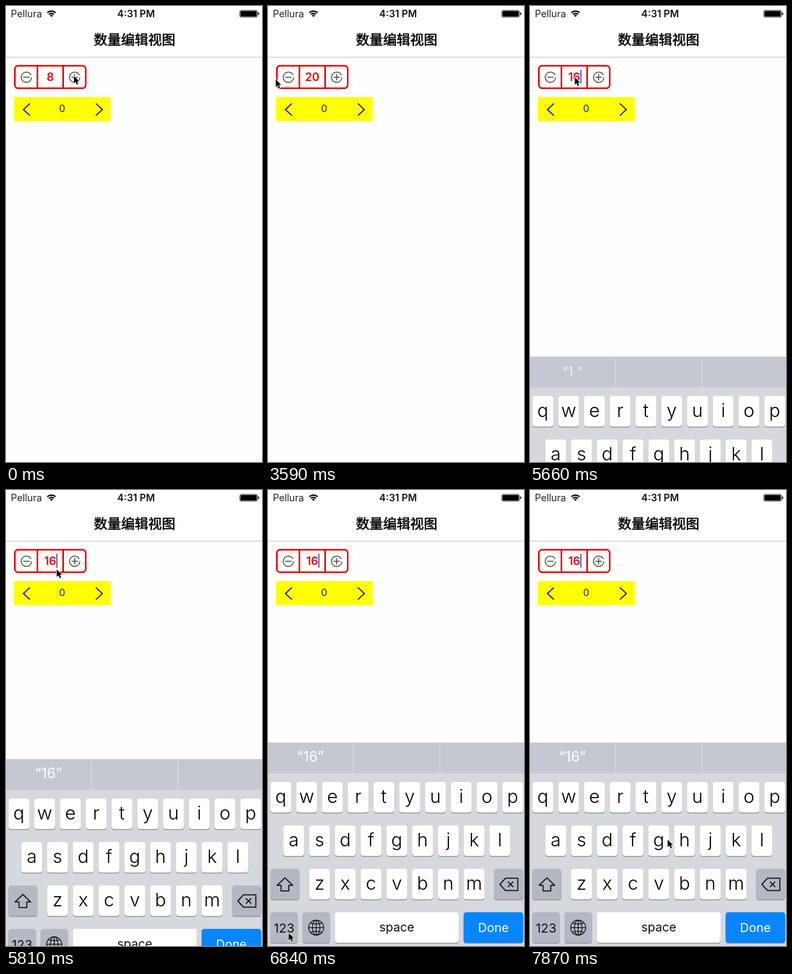
Write an HTML page with a canvas that moves like this. It is 477 px wide and 851 px high and loops after 8000 ms.

```html
<!DOCTYPE html>
<html lang="zh">
<head>
<meta charset="utf-8">
<title>数量编辑视图</title>
<style>
html, body { margin: 0; width: 100%; height: 100%; overflow: hidden; background: #fefefe; }
canvas { display: block; width: 477px; height: 851px; }
</style>
</head>
<body>
<canvas id="stage"></canvas>
<script>
const W = 477, H = 851, LOOP = 8000, TICK = 148.4;
const RED = '#f50000', DARK = '#484848', KEYS_IN = 38;
const canvas = document.getElementById('stage');
const ctx = canvas.getContext('2d');
const dpr = window.devicePixelRatio || 1;
canvas.width = W * dpr;
canvas.height = H * dpr;

const clamp = (v, lo, hi) => Math.max(lo, Math.min(hi, v));
const within = (n, from, to) => n >= from && n < to;

// Places where the pointer rests or turns, by tick.
const stops = [
  { n: 22, x: 126.5, y: 130.5 },
  { n: 24, x: 14.5, y: 137 },
  { n: 26, x: 26.5, y: 134 },
  { n: 33, x: 26.5, y: 134 },
  { n: 36, x: 83.5, y: 133 },
  { n: 38, x: 83.5, y: 133 },
  { n: 40, x: 105.5, y: 163.5 },
  { n: 46, x: 38.5, y: 826.5 },
  { n: 51, x: 270, y: 646 },
  { n: 53, x: 256.5, y: 652.5 }
];

function pointerAt(n) {
  const i = stops.findIndex(s => s.n >= n);
  const b = stops[i], a = stops[i - 1] || b;
  const k = a === b ? 0 : (n - a.n) / (b.n - a.n);
  const ease = k * k * (3 - 2 * k);
  return [a.x + (b.x - a.x) * ease, a.y + (b.y - a.y) * ease];
}

// Holding plus adds one per tick; each tap on minus takes two ticks.
const countAt = n => n < 26 ? clamp(n + 6, 8, 20) : Math.max(16, 19 - Math.floor((n - 26) / 2));
const plusDown = n => within(n, 1, 14) || within(n, 16, 21);
const minusDown = n => within(n, 26, 33) && n % 2 === 0;
const caretOn = n => n >= KEYS_IN && (n - KEYS_IN) % 7 < 4;

function text(s, x, y, size, weight, color, align = 'center', family = 'Inter, Roboto') {
  ctx.font = `${weight} ${size}px ${family}, sans-serif`;
  ctx.textAlign = align;
  ctx.fillStyle = color;
  ctx.fillText(s, x, y);
}

function rect(x, y, w, h, color) {
  ctx.fillStyle = color;
  ctx.fillRect(x, y, w, h);
}

function round(x, y, w, h, r, color) {
  ctx.beginPath();
  ctx.roundRect(x, y, w, h, r);
  ctx.fillStyle = color;
  ctx.fill();
}

function stroke(color, width) {
  ctx.strokeStyle = color;
  ctx.lineWidth = width;
  ctx.stroke();
}

function line(points, color, width, closed) {
  ctx.beginPath();
  for (let i = 0; i < points.length; i += 2) ctx.lineTo(points[i], points[i + 1]);
  if (closed) ctx.closePath();
  stroke(color, width);
}

function arc(x, y, r, from, to, color, width) {
  ctx.beginPath();
  ctx.arc(x, y, r, from, to);
  stroke(color, width);
}

function header() {
  rect(0, 0, W, 95, '#fff');
  rect(0, 95, W, 1, '#b8b8b8');
  text('Pellura', 9, 21, 18, 400, '#222', 'left');
  text('4:31 PM', 242.5, 20.8, 18.2, 600, '#111');

  const up = -Math.PI / 2;
  for (const r of [2, 6.8, 11]) arc(84.7, 20.5, r, up - .78, up + .78, '#000', r < 3 ? 4 : 2.4);

  ctx.beginPath();
  ctx.roundRect(435.5, 8, 33, 13, 3);
  stroke('#333', 1);
  round(436.8, 9.2, 30.4, 10.6, 1.5, '#000');
  round(469.6, 12, 2, 5, 1, '#000');

  const title = '数量编辑视图';
  text(title, 239.7, 71.5, 25.3, 500, '#000', 'center', '"Noto Sans CJK SC", "Noto Sans CJK"');
  ctx.strokeStyle = '#000';
  ctx.lineWidth = .7;
  ctx.strokeText(title, 239.7, 71.5);
}

function ringIcon(x, plus, color) {
  const y = 133;
  arc(x, y, 9.7, .02, Math.PI * 2 - .45, color, 1.7);
  line([x - 6, y, x + 6, y], color, 1.7);
  if (plus) line([x, y - 6, x, y + 6], color, 1.7);
}

function chevron(x, dir) {
  line([x - dir * 6, 182, x + dir * 6, 193.2, x - dir * 6, 204.5], '#222', 2.2);
}

function counters(n) {
  ctx.beginPath();
  ctx.roundRect(16.5, 111.5, 132, 42, 6);
  stroke(RED, 3);
  for (const x of [57, 105]) rect(x, 112, 3, 41, RED);
  ringIcon(38, false, minusDown(n) ? '#e83020' : DARK);
  ringIcon(128, true, plusDown(n) ? '#e83020' : DARK);
  text(countAt(n), 82.4, 139.6, 21, 600, RED);
  if (caretOn(n)) rect(93.5, 119, 2.5, 26, '#5068d8');

  rect(15, 170, 180, 45, '#ff0');
  chevron(38.5, -1);
  chevron(173.5, 1);
  text('0', 104.6, 198, 18, 400, '#222');
}

function key(x, y, w, color = '#fff') {
  round(x, y + 1.6, w, 57, 5, '#8b8e94');
  round(x, y, w, 57, 5, color);
}

function letterRow(letters, x, y) {
  [...letters].forEach((c, i) => {
    key(x + i * 48, y, 39);
    text(c, x + i * 48 + 19.5, y + 38.7, 34.5, 360, '#000');
  });
}

function globe(x, y, r) {
  arc(x, y, r, 0, 7, '#111', 1.5);
  ctx.beginPath();
  ctx.ellipse(x, y, r * .5, r, 0, 0, 7);
  for (const s of [-1, 1]) {
    ctx.moveTo(x - r * .78, y + s * r * .6);
    ctx.quadraticCurveTo(x, y + s * r * .38, x + r * .78, y + s * r * .6);
  }
  stroke('#111', 1.5);
  line([x, y - r, x, y + r], '#111', 1.5);
  line([x - r, y, x + r, y], '#111', 1.5);
}

function shiftIcon(x, y) {
  line([x, y - 14, x + 14.5, y, x + 7.2, y, x + 7.2, y + 10.5,
    x - 7.2, y + 10.5, x - 7.2, y, x - 14.5, y], '#111', 2, true);
}

function deleteIcon(x, y) {
  line([x - 20, y, x - 9.5, y - 11.5, x + 13.5, y - 11.5,
    x + 13.5, y + 11.5, x - 9.5, y + 11.5], '#111', 2, true);
  for (const s of [-5, 5]) line([x - 5, y - s, x + 5, y + s], '#111', 2);
}

// Laid out at its resting place and shifted down by a damped spring.
function keyboard(n) {
  const s = 1.735 + (n - KEYS_IN) * 2.4;
  ctx.save();
  ctx.translate(0, Math.round(379.5 * (1 + s) * Math.exp(-s)));
  ctx.lineJoin = 'round';

  rect(0, 471.5, W, 380, '#d5d9de');
  rect(0, 471.5, W, 57, '#c4c8d0');
  for (const x of [159, 319.7]) rect(x, 471.5, 1.3, 57, '#dcdfe4');
  if (n === KEYS_IN) text('“1 ”', 79, 507.5, 24, 400, 'rgba(255,255,255,.75)');
  else text('“16”', 79, 506.8, 26.5, 400, '#fff');

  letterRow('qwertyuiop', 4.5, 545);
  letterRow('asdfghjkl', 28.5, 626);
  letterRow('zxcvbnm', 76.5, 707);

  const gray = '#b3b8c3';
  for (const x of [4.5, 421.5]) key(x, 707, 54, gray);
  for (const x of [4.5, 64.5]) key(x, 788, 51, gray);
  key(124.5, 788, 231);
  key(364.5, 788, 111, '#0885ff');

  shiftIcon(31.5, 737.7);
  deleteIcon(452, 736);
  globe(89.8, 816.7, 14);
  text('123', 30, 826, 23.5, 400, '#111');
  text('space', 240, 824, 22.8, 400, '#111');
  text('Done', 420, 824.5, 23, 400, '#fff');
  ctx.restore();
}

function pointer(n) {
  ctx.save();
  ctx.translate(...pointerAt(n));
  ctx.lineJoin = 'round';
  line([0, 0, 0, 14, 3.2, 11, 5.5, 16.3, 8, 15.2, 5.8, 10.2, 10, 10], '#fff', 2, true);
  ctx.fillStyle = '#000';
  ctx.fill();
  ctx.restore();
}

function draw(now) {
  const n = Math.floor(now % LOOP / TICK);
  ctx.setTransform(dpr, 0, 0, dpr, 0, 0);
  rect(0, 0, W, H, '#fefefe');
  header();
  counters(n);
  if (n >= KEYS_IN) keyboard(n);
  pointer(n);
}

const start = performance.now();
function loop() {
  draw(performance.now() - start);
  requestAnimationFrame(loop);
}
loop();
</script>
</body>
</html>
```
